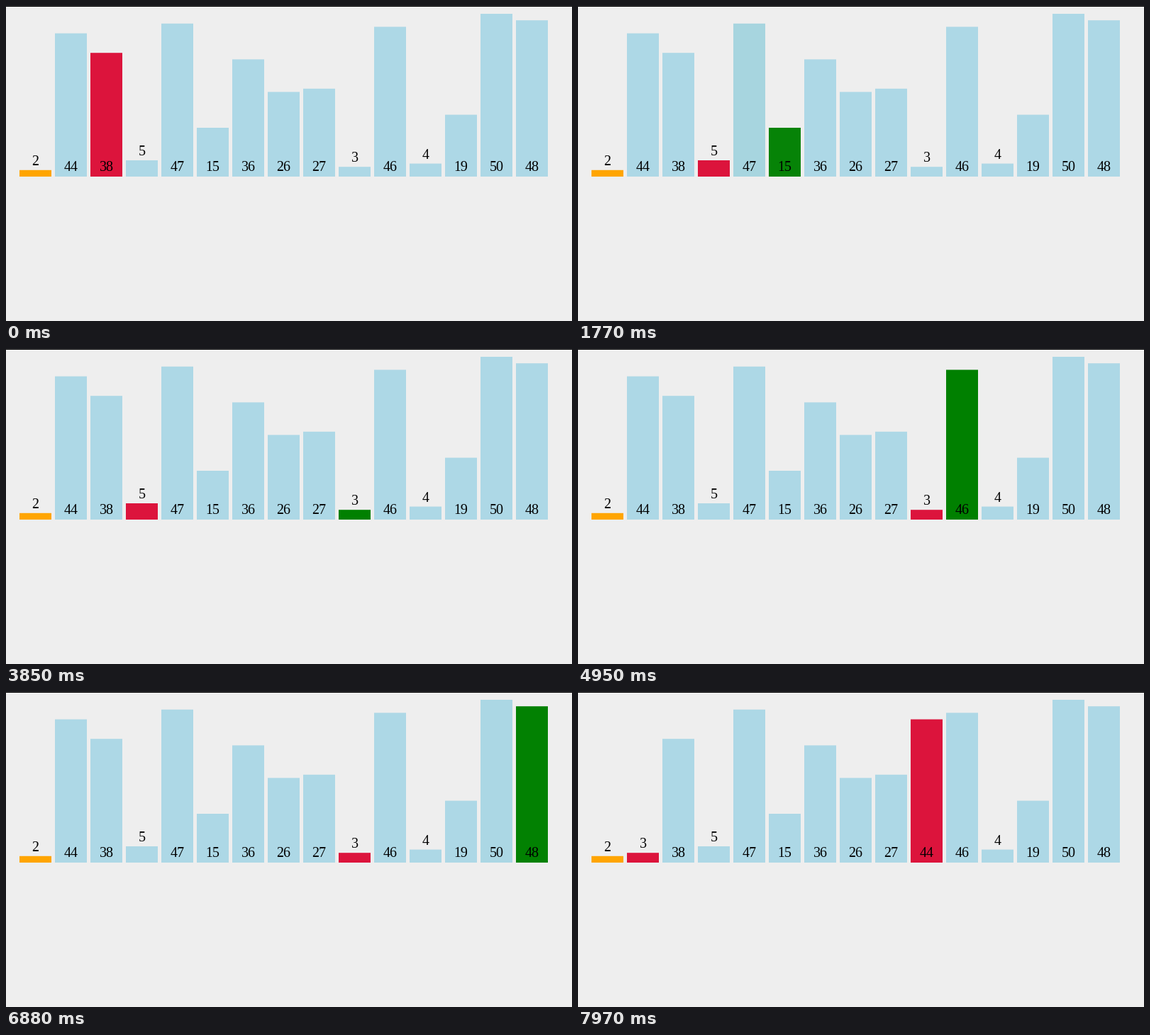
A matplotlib script that plays this animation: 798 by 445 pixels, repeating every 8000 ms.

```python
import matplotlib.pyplot as plt
import numpy as np
from matplotlib.animation import FuncAnimation
from matplotlib.colors import to_rgb
from matplotlib.patches import Rectangle

W, H, DPI = 798, 445, 100
LOOP, TICK = 8000, 20
STEP, EASE_TIME = 510, 300

VALUES = [2, 44, 38, 5, 47, 15, 36, 26, 27, 3, 46, 4, 19, 50, 48]
LEFT, PITCH, BAR_W, BASE, UNIT = 19, 50, 45, 241, 4.6
GAP_ABOVE, GAP_INSIDE = 7, 8

IDLE, SORTED, LOWEST, SCAN = (
    np.array(to_rgb(name))
    for name in ("lightblue", "orange", "crimson", "green"))


def selection_pass(slot, low, scan_from):
    """Highlights for each step of one pass, and the index of the minimum."""
    steps = [{low: LOWEST}]
    for i in range(scan_from, len(VALUES)):
        steps.append({low: LOWEST, i: SCAN})
        if VALUES[i] < VALUES[low]:
            low = i
            steps.append({low: LOWEST})
    pair = {slot: LOWEST, low: LOWEST}
    return steps + [pair, pair], low


TARGET = 1
STEPS, LOW = selection_pass(TARGET, low=2, scan_from=3)
SWAP_STEP = len(STEPS) - 2


def ease(p):
    """Cubic in and out, resting at 1."""
    p = min(p, 1)
    return 4 * p ** 3 if p < 0.5 else 1 - 4 * (1 - p) ** 3


def color_at(step, i):
    return SORTED if i == 0 else STEPS[step].get(i, IDLE)


fig = plt.figure(figsize=(W / DPI, H / DPI), dpi=DPI, facecolor="#eeeeee")
ax = fig.add_axes([0, 0, 1, 1])
ax.set_xlim(0, W)
ax.set_ylim(H, 0)
ax.axis("off")
ax.add_patch(Rectangle((0, 0), W, 1, fc="black", lw=0))

bars, labels = [], []
for i, value in enumerate(VALUES):
    top = BASE - value * UNIT
    bar = Rectangle((0, top), BAR_W, BASE - top, lw=0, snap=False,
                    zorder=2 + i)
    bars.append(ax.add_patch(bar))
    baseline = top - GAP_ABOVE if value < 10 else BASE - GAP_INSIDE
    labels.append(ax.text(0, baseline, str(value), ha="center",
                          va="baseline", family="Liberation Serif",
                          size=20 * 72 / DPI, color="black",
                          zorder=2.5 + i))


def draw(frame):
    step, elapsed = divmod((frame + 0.5) * TICK, STEP)
    step = int(step)
    p = ease(elapsed / EASE_TIME)
    shift = (LOW - TARGET) * PITCH * p if step == SWAP_STEP else 0

    for i, (bar, label) in enumerate(zip(bars, labels)):
        before, after = color_at(step, i), color_at(step + 1, i)
        bar.set_facecolor(before + (after - before) * p)
        x = LEFT + PITCH * i + shift * ((i == TARGET) - (i == LOW))
        bar.set_x(x)
        label.set_x(x + BAR_W / 2)
    return bars + labels


anim = FuncAnimation(fig, draw, frames=LOOP // TICK, interval=TICK,
                     init_func=lambda: draw(0), repeat=True, repeat_delay=0)
plt.show()
```
